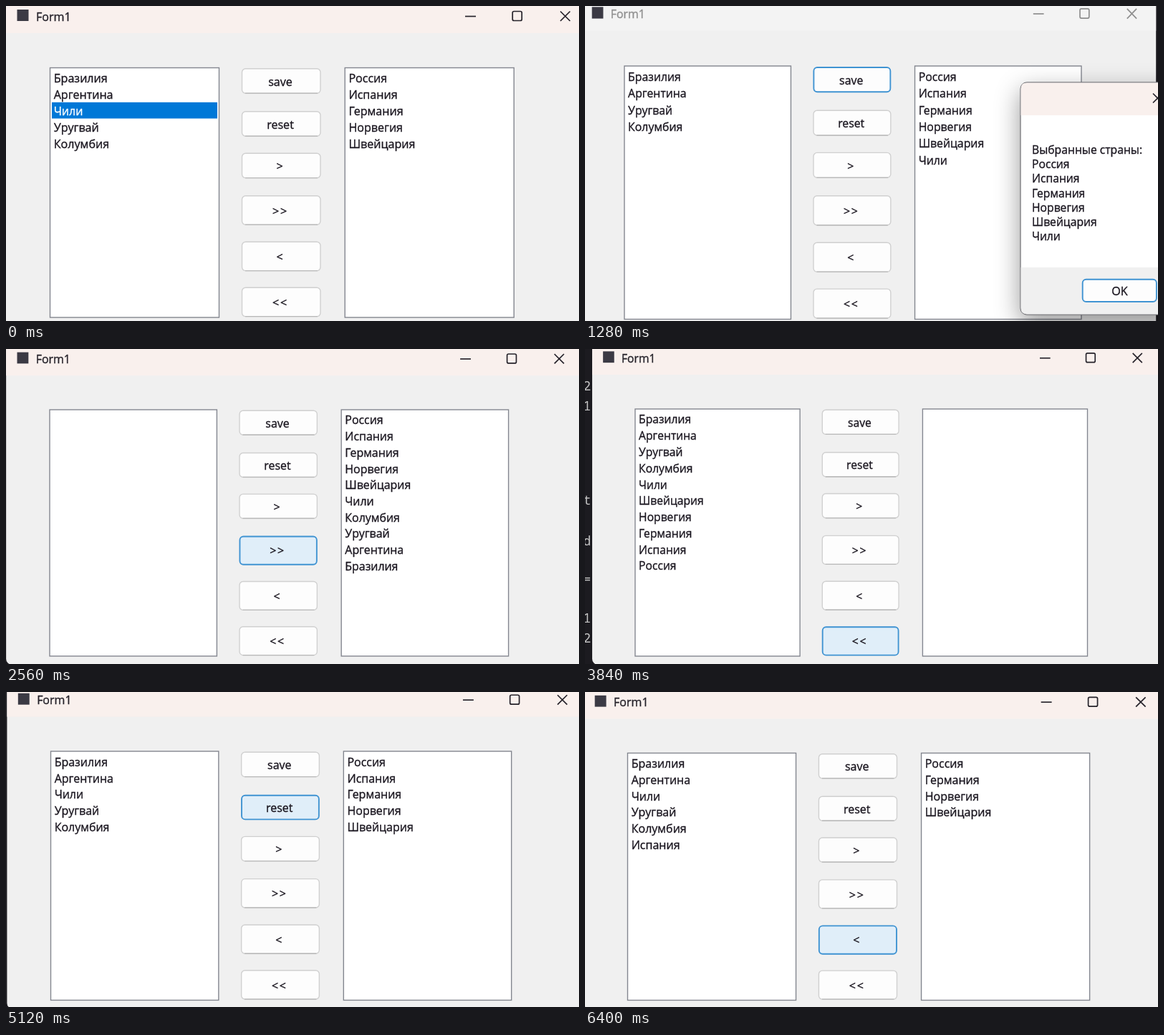
Recreate the animation shown at these times as an HTML page. Size 800x441 px, loop 7680 ms.

```html
<!DOCTYPE html>
<html lang="ru">
<head>
<meta charset="utf-8">
<title>Form1</title>
<style>
html, body { margin: 0; width: 100%; height: 100%; overflow: hidden; background: #1c1b20; }
svg { display: block; width: 100vw; height: 100vh; }
text {
  font: 16.1px "Open Sans", "Noto Sans", sans-serif;
  fill: #1b1720; stroke: #1b1720; stroke-width: .35px; white-space: pre;
}
.code { font: 18px "Noto Sans Mono", "DejaVu Sans Mono", monospace; fill: #c4c4c4; stroke: none; }
.dialog { filter: drop-shadow(0 12px 17px rgba(0, 0, 0, .4)); }
</style>
</head>
<body>
<svg id="stage" viewBox="0 0 800 441" preserveAspectRatio="none"></svg>
<script>
const stage = document.getElementById('stage');
const STEP = 1280;
const BLUE = '#3f93d2';
const INK = '#25222a';

const EUROPE = ['Россия', 'Испания', 'Германия', 'Норвегия', 'Швейцария'];
const AMERICA = ['Бразилия', 'Аргентина', 'Чили', 'Уругвай', 'Колумбия'];
const without = (list, name) => list.filter(item => item !== name);

// label, top, height
const BUTTONS = [
  ['save', 87.8, 34.4], ['reset', 147.8, 34.4], ['>', 206.2, 34.4],
  ['>>', 265.7, 40.4], ['<', 330.2, 40.4], ['<<', 394.2, 40.4]
];

// view: left, top, x scale, y scale of the form
const SCENES = [
  { view: [61.5, 86.5, 1, 1], left: AMERICA, right: EUROPE, picked: 2 },
  { view: [55, 84, .985, 1.0143], left: without(AMERICA, 'Чили'), right: [...EUROPE, 'Чили'],
    focus: 'save', dialog: true },
  { view: [61, 85, .989, .987], left: [],
    right: [...EUROPE, 'Чили', 'Колумбия', 'Уругвай', 'Аргентина', 'Бразилия'],
    focus: '>>', hover: true },
  { view: [70, 84, .975, .99],
    left: [...without(AMERICA, 'Чили'), 'Чили', ...[...EUROPE].reverse()], right: [],
    focus: '<<', hover: true, code: true },
  { view: [62.5, 83, .993, .997], left: AMERICA, right: EUROPE, focus: 'reset', hover: true },
  { view: [59.5, 85.5, .996, .99], left: [...AMERICA, 'Испания'],
    right: without(EUROPE, 'Испания'), focus: '<', hover: true }
];

const esc = s => s.replace(/</g, '&lt;').replace(/>/g, '&gt;');
const rect = (x, y, w, h, fill, more = '') =>
  `<rect x="${x}" y="${y}" width="${w}" height="${h}" fill="${fill}" ${more}/>`;
const text = (x, y, s, more = '') => `<text x="${x}" y="${y}" ${more}>${esc(s)}</text>`;
const ink = color => `style="fill:${color};stroke:${color}"`;
const line = (d, color, width = 1.7) =>
  `<path d="${d}" fill="none" stroke="${color}" stroke-width="${width}"/>`;
const area = (d, fill) => `<path d="${d}" fill="${fill}"/>`;

function listBox(x, items, picked) {
  const rows = items.map((item, i) => {
    const on = i === picked;
    return (on ? rect(x + 2.5, 88.8 + i * 23, 231, 22.7, '#0078d7') : '') +
      text(x + 5.2, 107.2 + i * 23, item, on ? ink('#fff') : '');
  });
  return rect(x, 86.5, 236, 349.5, '#fff', 'stroke="#83868f" stroke-width="1.4"') + rows.join('');
}

function button([label, y, h], focus, hover) {
  const on = label === focus;
  const arrow = /[<>]/.test(label);
  const name = text(383, y + h / 2 + 6.7, label,
    `text-anchor="middle"${arrow ? ' letter-spacing="1.7"' : ''}`);
  if (on) {
    return rect(329.9, y + .6, 108.6, h - .6, hover ? '#e0eef9' : '#fdfdfd',
      `rx="5" stroke="${BLUE}" stroke-width="1.9"`) + name;
  }
  return rect(329.5, y, 109.5, h, '#fdfdfd', 'rx="5" stroke="#d0d0d0" stroke-width="1.4"') +
    line(`M334 ${y + h}H435`, '#b9b9b9', 1.3) + name;
}

function titleBar(active) {
  const color = active ? INK : '#8e8e8e';
  return rect(0, -20, 815, 58, active ? '#f9f0ed' : '#f3f3f3') +
    rect(15.5, 5, 16, 16, '#3b3a44') +
    text(42, 20.8, 'Form1', ink(color)) +
    line('M641 14.5H656', color) +
    rect(707.2, 7.5, 13, 13, 'none', `rx="2" stroke="${color}" stroke-width="1.7"`) +
    line('M774 7.5L787.5 21M787.5 7.5L774 21', color);
}

function dialog() {
  const lines = ['Выбранные страны:', ...EUROPE, 'Чили'];
  return '<g class="dialog">' +
    rect(608, 107, 220, 325, '#fff', 'rx="9" stroke="#77777b" stroke-width="1.3"') + '</g>' +
    area('M608.6 153V116Q608.6 107.6 617 107.6H800V153Z', '#f9f0ed') +
    area('M608.6 366V423Q608.6 431.4 617 431.4H800V366Z', '#f0f0f0') +
    line('M793 122.5L806 135.5M806 122.5L793 135.5', INK) +
    lines.map((s, i) => text(624, 207 + i * 20.2, s, 'style="font-size:15.7px"')).join('') +
    rect(694.7, 382.8, 103.2, 31.2, '#fdfdfd', `rx="5" stroke="${BLUE}" stroke-width="1.9"`) +
    text(746.5, 404.7, 'OK', 'text-anchor="middle"');
}

function codeEdge() {
  const marks = [['2', 58], ['1', 86], ['t', 218], ['d', 275], ['=', 328], ['1', 383], ['2', 411]];
  return marks.map(([s, y]) => text(-2.5, y, s, 'class="code"')).join('');
}

function draw(scene) {
  const [x, y, sx, sy] = scene.view;
  const place = `translate(${x} ${y}) scale(${sx} ${sy}) translate(-61.5 -86.5)`;
  stage.innerHTML = rect(0, 0, 800, 441, '#1c1b20') +
    (scene.code ? codeEdge() : '') +
    `<g transform="${place}">` +
    rect(0, -20, 815, 468, '#f0f0f0', 'rx="8"') +
    titleBar(!scene.dialog) +
    listBox(61.5, scene.left, scene.picked) +
    listBox(473.2, scene.right) +
    BUTTONS.map(b => button(b, scene.focus, scene.hover)).join('') + '</g>' +
    (scene.dialog ? dialog() : '');
}

let shown = -1;
const start = performance.now();
function tick(now) {
  const index = Math.floor(Math.max(0, now - start) / STEP) % SCENES.length;
  if (index !== shown) draw(SCENES[shown = index]);
  requestAnimationFrame(tick);
}
tick(start);
</script>
</body>
</html>
```
